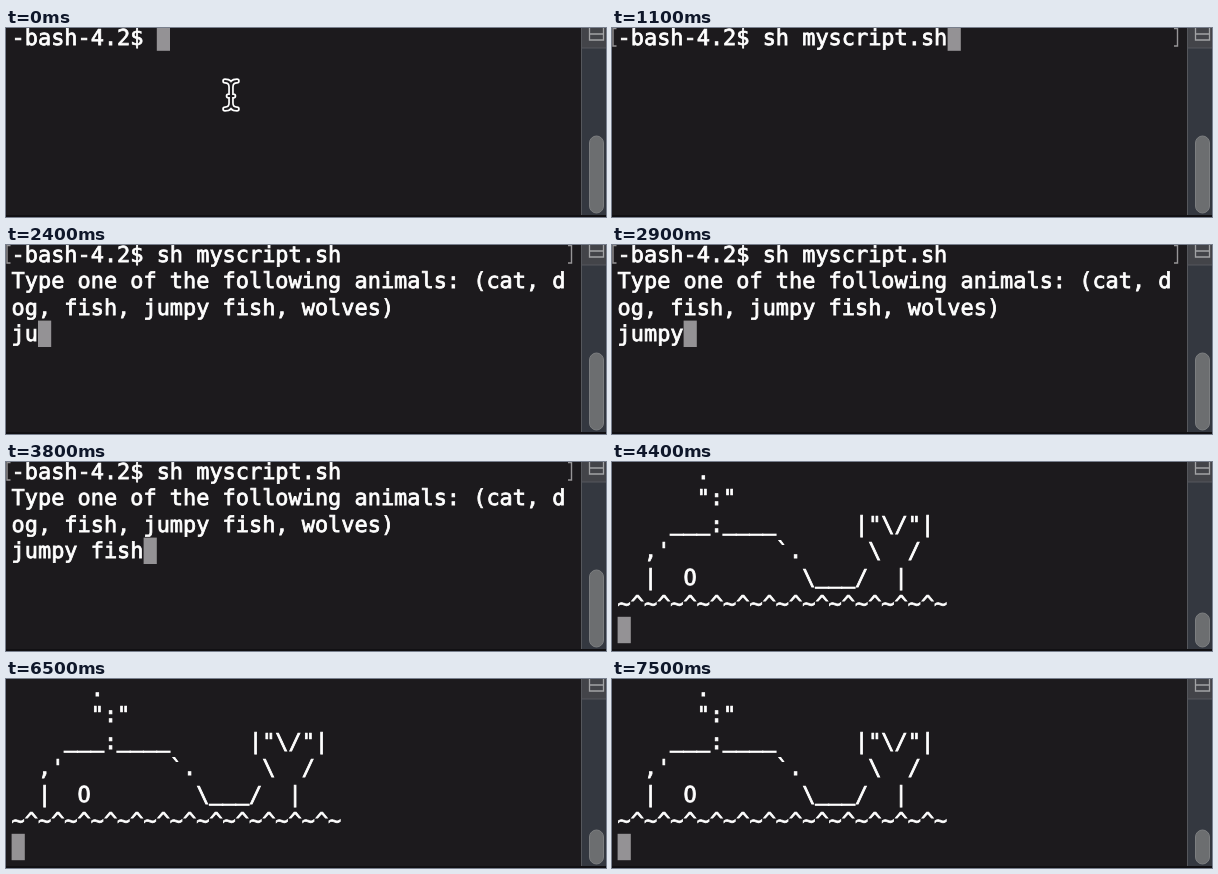
An HTML page that plays this animation: 600x189 px, repeating every 8000 ms.

```html
<!DOCTYPE html>
<html lang="en">
<head>
<meta charset="utf-8">
<title>Terminal session</title>
<style>
  html, body { margin: 0; width: 100%; height: 100%; overflow: hidden; background: #1c1a1d; }
  svg { display: block; width: 600px; height: 189px; }
  text {
    font-family: "DejaVu Sans Mono", monospace;
    font-size: 21.926px;
    white-space: pre;
    text-rendering: geometricPrecision;
    fill: #fff;
    stroke: #fff;
    stroke-width: .8;
  }
  text.rule { stroke-width: 1.3; }
</style>
</head>
<body>
<svg viewBox="0 0 600 189">
  <rect width="600" height="189" fill="#1c1a1d"/>
  <rect y="187" width="600" height="2" fill="#111013"/>

  <g id="scrollbar">
    <rect x="575" width="25" height="187" fill="#343840"/>
    <rect x="575" width="25" height="20" fill="#434449"/>
    <path d="M575.5 0V187M575 20H600" fill="none" stroke="#55575c"/>
    <path d="M583.5 -2V12H597.5V-2M583.5 6H597.5" fill="none" stroke="#a2a3a5" stroke-width="1.3"/>
    <rect id="thumb" x="583.5" width="14" rx="7" fill="#6c6e70" stroke="#7c7e80"/>
  </g>

  <path id="marks" d="M4.5 .5H1V18H4.5M562 .5H565.5V18H562" fill="none" stroke="#969597" stroke-width="1.4"/>
  <rect id="cursor" width="13.2" height="26.4" fill="#949295"/>
  <g id="screen"></g>

  <g id="pointer" fill="none" stroke-linecap="round" stroke-linejoin="round">
    <g stroke="#fff" stroke-width="5.6"><use href="#beam"/></g>
    <g stroke="#1c1a1d" stroke-width="2.2"><use href="#beam"/></g>
  </g>
  <defs>
    <path id="beam" d="M219 53Q225 53 225 59V75Q225 81 219 81M231 53Q225 53 225 59M225 75Q225 81 231 81M222.5 68H227.5"/>
  </defs>
</svg>
<script>
const DURATION = 8000;
const LEFT = 5.6, TOP = -3.6, COLUMN = 13.2, ROW = 26.4;
const BASELINE = 20.6, UNDERSCORE_BASELINE = 19.2;
const $ = id => document.getElementById(id);

const prompt = "-bash-4.2$ ";
const command = prompt + "sh myscript.sh";
const question = [
  command,
  "Type one of the following animals: (cat, d",
  "og, fish, jumpy fish, wolves)"
];
const answer = "jumpy fish";
const whale = [
  "      .",
  "      \":\"",
  "    ___:____      |\"\\/\"|",
  "  ,'        `.     \\  /",
  "  |  O        \\___/  |",
  "~^".repeat(12) + "~",
  ""
];

// When the answer reaches each length: [ms, characters].
const keystrokes = [
  [2400, 2], [2600, 3], [2800, 4], [2900, 5], [3100, 6],
  [3400, 7], [3500, 8], [3600, 9], [3800, 10]
];

function linesAt(t) {
  if (t < 400) return [prompt];
  if (t < 700) return [prompt + "clear"];
  if (t < 1200) return [command];
  if (t >= 4400) return whale;
  const typed = keystrokes.filter(([time]) => time <= t).pop();
  return [...question, answer.slice(0, typed ? typed[1] : 0)];
}

function addText(y, className) {
  const text = document.createElementNS("http://www.w3.org/2000/svg", "text");
  text.setAttribute("x", LEFT);
  text.setAttribute("y", y);
  text.setAttribute("class", className);
  $("screen").append(text);
  return text;
}

// Underscores sit higher and heavier than the font draws them, so they get their own layer.
const rows = whale.map((_, i) => ({
  glyphs: addText(TOP + i * ROW + BASELINE, "glyphs"),
  underscores: addText(TOP + i * ROW + UNDERSCORE_BASELINE, "rule")
}));

function draw(t) {
  const lines = linesAt(t);
  rows.forEach((row, i) => {
    const line = lines[i] || "";
    row.glyphs.textContent = line.replace(/_/g, " ");
    row.underscores.textContent = line.replace(/[^_]/g, " ");
  });

  const last = lines.length - 1;
  $("cursor").setAttribute("x", LEFT + lines[last].length * COLUMN);
  $("cursor").setAttribute("y", TOP + last * ROW);

  const thumbTop = t < 4400 ? 108 : 151;
  $("thumb").setAttribute("y", thumbTop);
  $("thumb").setAttribute("height", 185 - thumbTop);

  $("pointer").style.display = t < 300 ? "" : "none";
  $("marks").style.display = t >= 1100 && t < 4400 ? "" : "none";
}

const start = performance.now();
function tick() {
  draw((performance.now() - start) % DURATION);
  requestAnimationFrame(tick);
}
tick();
</script>
</body>
</html>
```
